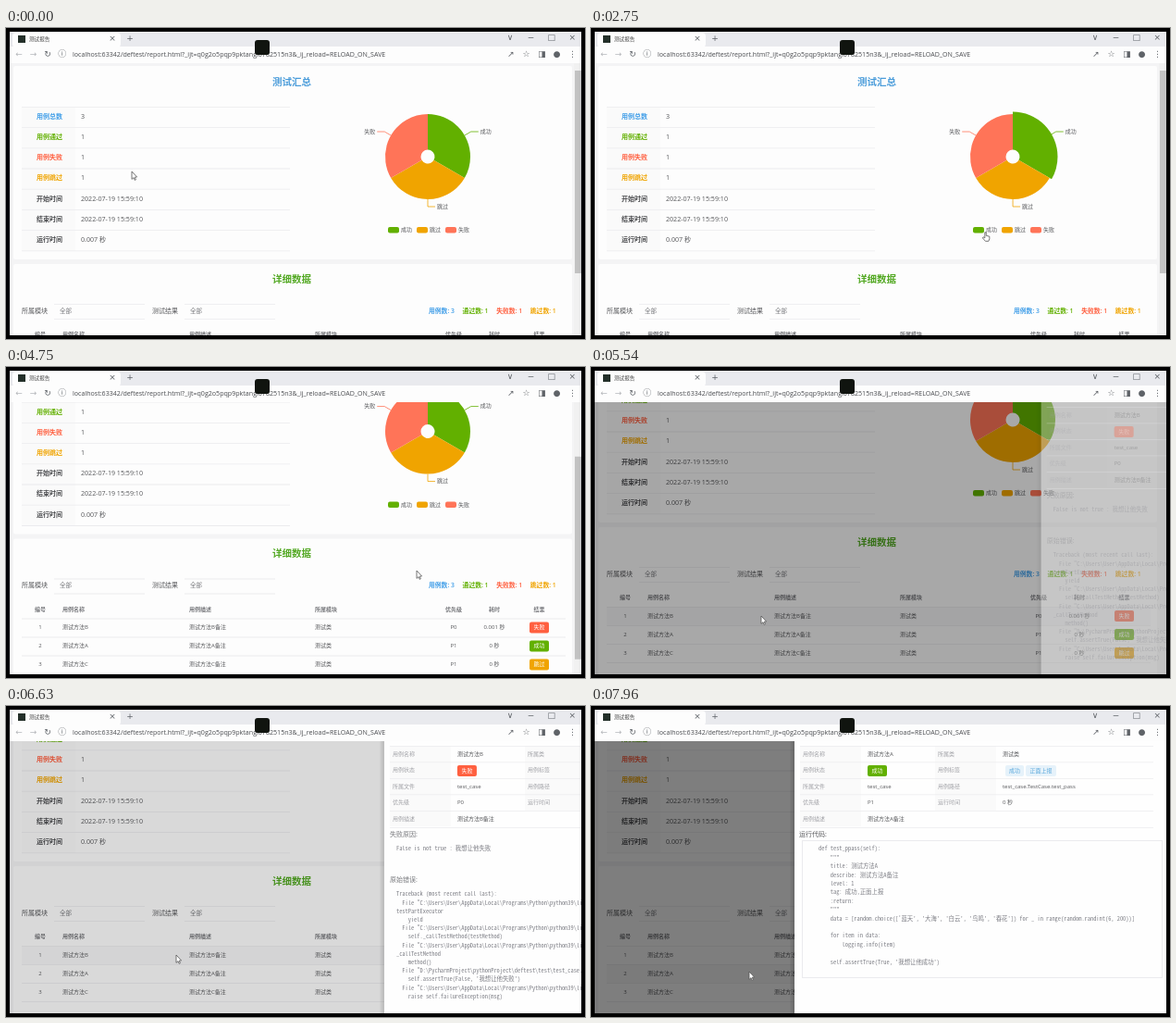
An HTML page with a canvas that plays this animation: 626 px wide and 336 px high, repeating every 8000 ms.

```html
<!DOCTYPE html>
<html lang="zh-CN">
<head>
<meta charset="utf-8">
<style>
html, body { margin: 0; width: 100%; height: 100%; overflow: hidden; background: #000; }
canvas { display: block; }
</style>
</head>
<body>
<canvas id="stage" width="626" height="336"></canvas>
<script>
const ctx = document.getElementById('stage').getContext('2d');
const LOOP = 8000, SCROLL = 82;
const LEFT = 4, RIGHT = 622, TOP = 38, BOTTOM = 332;
const SANS = '"Open Sans", "Noto Sans CJK SC", "Noto Sans CJK", sans-serif';
const MONO = '"Noto Sans Mono CJK SC", "Liberation Mono", monospace';
const ICONS = '"DejaVu Sans", "Noto Sans CJK SC", sans-serif';
const BLUE = '#409ee8', GREEN = '#62b000', ORANGE = '#f0a400', RED = '#ff7458', FAIL = '#ff6040';
const INK = '#56575a', SOFT = '#77787c', PALE = '#a0a1a6', LINE = '#ebebee', PAPER = '#fdfdfd';

const clamp = v => Math.max(0, Math.min(1, v));
const lerp = (a, b, k) => a + (b - a) * k;
const ramp = (t, start, length) => clamp((t - start) / length);
const easeOut = k => 1 - (1 - k) ** 3;
const smooth = k => k * k * (3 - 2 * k);

function text(str, x, y, { color = INK, size = 7, weight = 400, family = SANS, align = 'left' } = {}) {
  ctx.font = `${weight} ${size}px ${family}`;
  ctx.textAlign = align;
  ctx.textBaseline = 'middle';
  ctx.fillStyle = color;
  ctx.fillText(str, x, y);
}

function rect(x, y, w, h, color, radius = 0) {
  ctx.fillStyle = color;
  ctx.beginPath();
  ctx.roundRect(x, y, w, h, radius);
  ctx.fill();
}

const rule = (x, y, w) => rect(x, y, w, 0.8, LINE);
const heading = (str, y, color) => text(str, 309, y, { color, size: 10.5, weight: 700, align: 'center' });

function tag(label, x, y, color, width = 21, ink = '#fff') {
  rect(x, y - 6, width, 12, color, 2);
  text(label, x + width / 2, y, { color: ink, size: 6, align: 'center' });
}

function icons(glyphs, x, step, y, color = '#5f6368', size = 9) {
  [...glyphs].forEach((glyph, i) =>
    text(glyph, x + i * step, y, { color, size, family: ICONS, align: 'center' }));
}

function browser() {
  rect(LEFT, 4, RIGHT - LEFT, 16, '#e9eaee');
  rect(7, 5, 117, 16, PAPER, 4);
  rect(LEFT, 20, RIGHT - LEFT, 18, PAPER);
  rect(13, 8, 8, 8, '#24302a');
  text('测试报告', 25, 12.5, { color: '#444', size: 5.6 });
  icons('×+', 115, 19, 11.5);
  icons('∨−□×', 545, 22.4, 11);
  icons('←→', 14, 15.6, 28.5, '#b4b6ba');
  icons('↻ⓘ', 45, 15.8, 28.5);
  icons('↗☆◨●⋮', 546, 16.6, 28.5);
  text('localhost:63342/deftest/report.html?_ijt=q0g2o5pqp9pktangl0782515n3&_ij_reload=RELOAD_ON_SAVE',
    72, 29, { color: '#4a4c50', size: 7.1 });
  rect(269, 13, 16, 16, '#10140f', 3);
}

const PIE = [['成功', GREEN], ['跳过', ORANGE], ['失败', RED]];
// Legend clicks: time and the slice hidden from then on.
const CLICKS = [[-LOOP, null], [1850, 0], [2350, null], [3200, 1], [3773, null]];

function span(i, hidden) {
  const size = hidden === null ? 120 : 180;
  const start = size * (hidden !== null && i > hidden ? i - 1 : i);
  return [start, start + size];
}

function pie(t) {
  const cx = 456, cy = 139;
  const index = CLICKS.findLastIndex(([time]) => time <= t);
  const [when, hidden] = CLICKS[index];
  const previous = index ? CLICKS[index - 1][1] : null;
  const turn = easeOut(ramp(t, when, 300));
  const labelTurn = easeOut(ramp(t, when + 132, 300));
  const hovered = t < 1690 || t > 4350 ? null : t < 2800 ? 0 : 1;
  const radians = degrees => (degrees - 90) * Math.PI / 180;
  const center = ([from, to]) => (from + to) / 2;

  PIE.forEach(([label, color], i) => {
    const x = 413 + 31 * i, off = i === hidden;
    rect(x, 215, 12, 6.5, off ? '#ccc' : color, 2);
    text(label, x + 14, 218.5, { color: off ? '#ccc' : INK, size: 6 });
    if (off) return;

    const now = span(i, hidden), isNew = i === previous;
    const old = isNew ? [now[0], now[0]] : span(i, previous);
    const [from, to] = now.map((end, k) => radians(lerp(old[k], end, turn)));
    ctx.fillStyle = color;
    ctx.beginPath();
    ctx.arc(cx, cy, hovered === i ? 48.5 : 46, from, to);
    ctx.arc(cx, cy, 7.5, to, from, true);
    ctx.fill();

    const middle = lerp(isNew ? center(now) : center(old), center(now), labelTurn);
    const a = radians(middle), side = middle > 180.1 ? -1 : 1;
    const at = r => [cx + r * Math.cos(a), cy + r * Math.sin(a)];
    const [ex, ey] = at(54);
    ctx.strokeStyle = color;
    ctx.lineWidth = 0.8;
    ctx.beginPath();
    ctx.moveTo(...at(46));
    ctx.lineTo(ex, ey);
    ctx.lineTo(ex + 8 * side, ey);
    ctx.stroke();
    text(label, ex + 10 * side, ey, { size: 6, align: side > 0 ? 'left' : 'right' });
  });
}

const SUMMARY = [
  ['用例总数', '3', BLUE], ['用例通过', '1', GREEN], ['用例失败', '1', FAIL], ['用例跳过', '1', ORANGE],
  ['开始时间', '2022-07-19 15:59:10'], ['结束时间', '2022-07-19 15:59:10'], ['运行时间', '0.007 秒']
];
const COLUMNS = [
  ['编号', 37, 'center'], ['用例名称', 61, 'left'], ['用例描述', 198, 'left'], ['所属模块', 334, 'left'],
  ['优先级', 484, 'center'], ['耗时', 528, 'center']
];
const CASES = [
  ['B', 'P0', '0.001 秒', '失败', FAIL],
  ['A', 'P1', '0 秒', '成功', GREEN],
  ['C', 'P1', '0 秒', '跳过', ORANGE]
];

function report(t, scroll, cursorY) {
  rect(LEFT, TOP, RIGHT - LEFT, BOTTOM - TOP, '#f4f4f5');
  ctx.save();
  ctx.translate(0, -scroll);
  rect(8, 41, 604, 209, PAPER, 2);
  rect(8, 255, 604, 175, PAPER, 2);
  heading('测试汇总', 59, '#4a9cda');
  rect(17, 85, 58, 156, '#fafafa');
  SUMMARY.forEach(([label, value, color = '#48494c'], i) => {
    const y = 96 + i * 22.2;
    rule(17, y - 11, 290);
    text(label, 33, y, { color, weight: 700 });
    text(value, 81, y, { size: 7.1 });
  });
  rule(17, 240.5, 290);
  pie(t);

  heading('详细数据', 272, '#52a822');
  ['所属模块', '测试结果'].forEach((label, i) => {
    const x = 17 + 141 * i;
    text(label, x, 306);
    text('全部', x + 41, 306, { color: SOFT, size: 6.5 });
    rule(x + 35, 298, 98);
    rule(x + 35, 314, 98);
  });
  ['用例数: 3', '通过数: 1', '失败数: 1', '跳过数: 1'].forEach((label, i) =>
    text(label, 457 + 36.6 * i, 306, { color: SUMMARY[i][2], size: 6.8, weight: 600 }));

  COLUMNS.forEach(([label, x, align]) => text(label, x, 331.5, { color: SOFT, size: 6, weight: 700, align }));
  text('结果', 576.5, 331.5, { color: SOFT, size: 6, weight: 700, align: 'center' });
  CASES.forEach(([letter, level, spent, result, color], i) => {
    const y = 351 + i * 20, name = '测试方法' + letter;
    if (Math.abs(cursorY + scroll - y) < 10) rect(17, y - 10, 588, 20, '#f7f7f8');
    rule(17, y - 10, 588);
    [i + 1, name, name + '备注', '测试类', level, spent].forEach((cell, k) =>
      text(cell, COLUMNS[k][1], y, { size: 6, align: COLUMNS[k][2] }));
    tag(result, 566, y, color);
  });
  rule(17, 401, 588);
  ctx.restore();
}

function scrollbar(scroll) {
  rect(614, TOP, RIGHT - 614, BOTTOM - TOP, '#f1f1f1');
  rect(615, 46 + scroll * 0.73, 7, 219, '#c2c2c2');
}

const LIB = 'File "C:\\Users\\User\\AppData\\Local\\Programs\\Python\\python39\\lib\\unittest\\case.py", line ';
const TRACE = `Traceback (most recent call last):
  ${LIB}59, in
testPartExecutor
    yield
  ${LIB}593, in run
    self._callTestMethod(testMethod)
  ${LIB}550, in
_callTestMethod
    method()
  File "D:\\PycharmProject\\pythonProject\\deftest\\test\\test_case.py", line 30, in test_fail
    self.assertTrue(False, '我想让他失败')
  ${LIB}687, in assertTrue
    raise self.failureException(msg)`;
const CODE = `def test_ppass(self):
    """
    title: 测试方法A
    describe: 测试方法A备注
    level: 1
    tag: 成功,正面上报
    :return:
    """
    data = [random.choice(['蓝天', '大海', '白云', '鸟鸣', '春花']) for _ in range(random.randint(6, 200))]

    for item in data:
        logging.info(item)

    self.assertTrue(True, '我想让他成功')`;

function code(source, x, y, step) {
  source.split('\n').forEach((line, i) =>
    text(line, x, y + i * step, { color: '#7c7d84', size: 6.4, family: MONO }));
}

function drawer(x, [letter, level, spent, result, color]) {
  const passed = result === '成功', name = '测试方法' + letter;
  ctx.save();
  ctx.translate(x, 0);
  rect(0, TOP, 410, BOTTOM - TOP, '#fefefe');
  rect(6, 43, 66, 87, 'rgba(0, 0, 0, .015)');
  rect(152, 43, 66, 70, 'rgba(0, 0, 0, .015)');
  [
    ['用例名称', name, '所属类', '测试类'],
    ['用例状态', '', '用例标签', ''],
    ['所属文件', 'test_case', '用例路径', 'test_case.TestCase.test_' + (passed ? 'pass' : 'fail')],
    ['优先级', level, '运行时间', spent],
    ['用例描述', name + '备注', '', '']
  ].forEach((cells, i) => {
    const y = 52 + i * 17.5;
    rule(6, y - 9, 382);
    cells.forEach((cell, k) =>
      text(cell, 9 + 73 * k - (k % 2) * 3, y, { color: k % 2 ? INK : PALE, size: 6 }));
  });
  rule(6, 131, 382);
  tag(result, 79, 70, color);
  tag(result, 228, 70, '#e6f2fa', 20, '#5aa8dc');
  tag('正面上报', 250, 70, '#e6f2fa', 33, '#5aa8dc');
  if (passed) {
    text('运行代码:', 5, 139);
    ctx.strokeStyle = LINE;
    ctx.lineWidth = 1;
    ctx.strokeRect(8.5, 145.5, 389, 148);
    code(CODE, 26, 154, 9.4);
  } else {
    text('失败原因:', 6, 139, { color: SOFT });
    code('False is not true : 我想让他失败', 13, 154, 9.2);
    text('原始错误:', 6, 188, { color: SOFT });
    code(TRACE, 13, 203, 9.2);
  }
  ctx.restore();
}

const FIRST_OPEN = 5440, CLOSE = 6490, SECOND_OPEN = 7308, SLIDE = 300;

function overlay(t) {
  const closing = t > CLOSE && t < SECOND_OPEN;
  const open = closing ? 1 - ramp(t, CLOSE, SLIDE) : ramp(t, t < CLOSE ? FIRST_OPEN : SECOND_OPEN, SLIDE);
  if (!open) return false;
  const shade = closing ? open * open : Math.min(1, open * 2);
  rect(LEFT, TOP, RIGHT - LEFT, BOTTOM - TOP, `rgba(0, 0, 0, ${0.5 * shade})`);
  const x = lerp(RIGHT, 220, open);
  ctx.globalAlpha = closing ? 1 : open;
  for (let i = 1; i < 6; i++) rect(x - i, TOP, i, BOTTOM - TOP, 'rgba(0, 0, 0, .03)');
  drawer(x, CASES[t < SECOND_OPEN ? 0 : 1]);
  ctx.globalAlpha = 1;
  return true;
}

// Arrival time and place of each cursor stop.
const STOPS = [[0, 136, 155], [1450, 420, 221], [3000, 444, 220], [5350, 184, 269], [7000, 171, 287]];

function cursorAt(t) {
  return STOPS.reduce(([x, y], [arrival, nextX, nextY]) => {
    const k = smooth(ramp(t, arrival - 350, 350));
    return [lerp(x, nextX, k), lerp(y, nextY, k)];
  }, STOPS[0].slice(1));
}

const ARROW = new Path2D('M0 0 V8.4 L2 6.7 L3.2 9.4 L4.4 8.8 L3.2 6.2 L5.6 6 Z');
const HAND = new Path2D('M1 0 H2.4 V3.5 L6 4.4 V7 L5 9.5 H1.6 L-1.5 6 L-.8 5 L1 6 Z');

function cursor(x, y, shape) {
  ctx.save();
  ctx.translate(x, y);
  ctx.fillStyle = '#fff';
  ctx.strokeStyle = '#555';
  ctx.lineWidth = 0.8;
  ctx.fill(shape);
  ctx.stroke(shape);
  ctx.restore();
}

function draw() {
  const t = performance.now() % LOOP;
  const scroll = SCROLL * smooth(ramp(t, 4450, 400));
  const [x, y] = cursorAt(t);
  rect(0, 0, 626, 336, '#000');
  ctx.save();
  ctx.beginPath();
  ctx.rect(LEFT, TOP, RIGHT - LEFT, BOTTOM - TOP);
  ctx.clip();
  report(t, scroll, y);
  if (!overlay(t)) scrollbar(scroll);
  ctx.restore();
  browser();
  cursor(x, y, t > 1400 && t < 4450 ? HAND : ARROW);
  requestAnimationFrame(draw);
}
draw();
</script>
</body>
</html>
```
